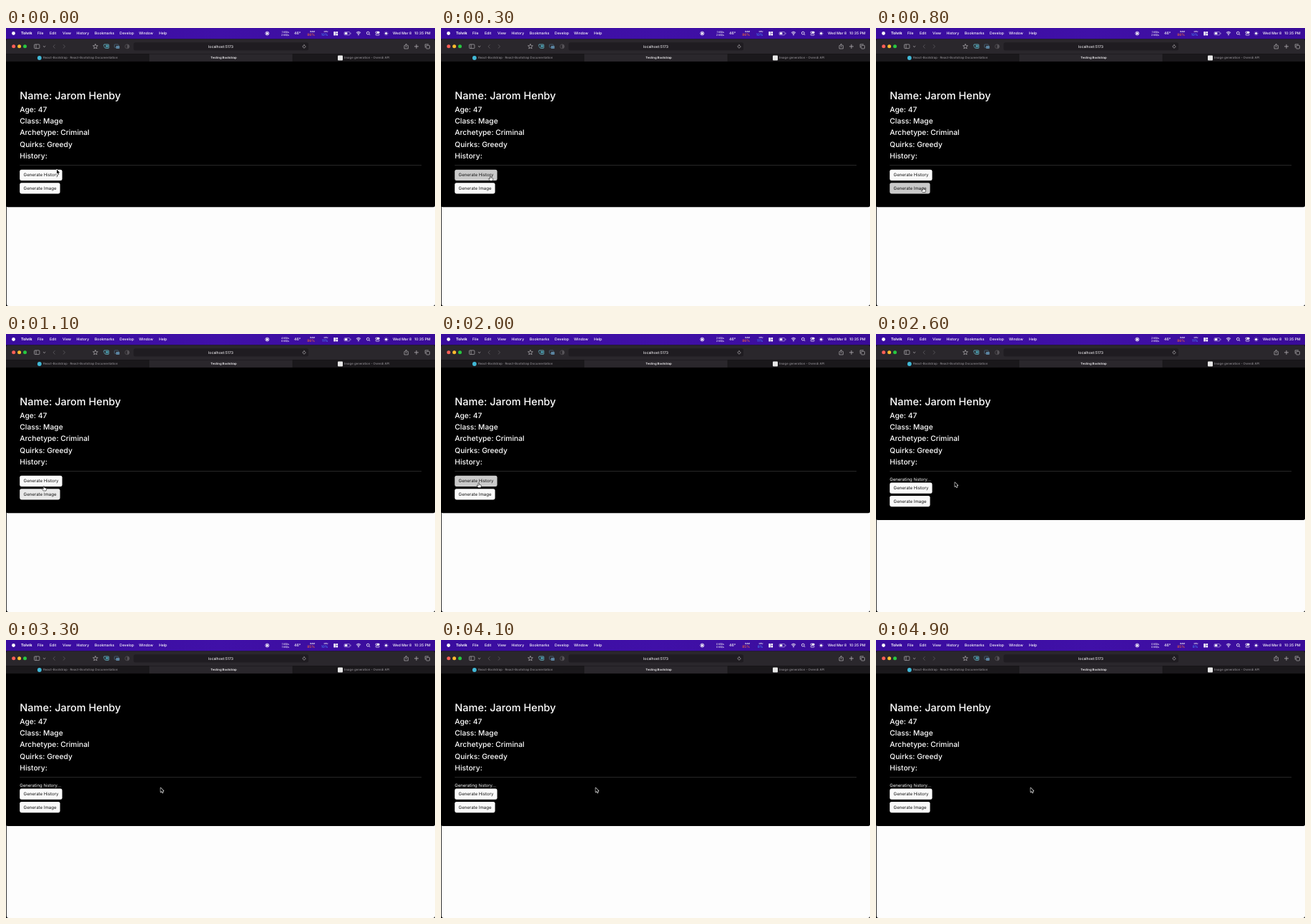
These frames come from a looping animation (600 by 390 pixels, 5000 ms). An HTML page with a canvas:

```html
<!DOCTYPE html>
<html lang="en">
<head>
<meta charset="utf-8">
<title>Testing Bootstrap</title>
<style>
  html, body { margin: 0; width: 100%; height: 100%; overflow: hidden; background: #000; }
  canvas { display: block; width: 600px; height: 390px; }
</style>
</head>
<body>
<canvas id="stage"></canvas>
<script>
const LOOP = 5000, STEP = 100, FADE = 150;
const canvas = document.getElementById('stage');
const g = canvas.getContext('2d');
const dpr = window.devicePixelRatio || 1;
canvas.width = 600 * dpr;
canvas.height = 390 * dpr;
g.scale(dpr, dpr);

function rect(x, y, w, h, color, r = 0) {
  g.fillStyle = color;
  g.beginPath();
  g.roundRect(x, y, w, h, r);
  g.fill();
}

function box(x, y, w, h, color, r = 0, lw = 0.7) {
  g.strokeStyle = color;
  g.lineWidth = lw;
  g.beginPath();
  g.roundRect(x, y, w, h, r);
  g.stroke();
}

function dot(x, y, r, color) {
  g.fillStyle = color;
  g.beginPath();
  g.arc(x, y, r, 0, Math.PI * 2);
  g.fill();
}

function ring(x, y, r, color, lw = 0.7, from = 0, to = Math.PI * 2) {
  g.strokeStyle = color;
  g.lineWidth = lw;
  g.beginPath();
  g.arc(x, y, r, from, to);
  g.stroke();
}

function line(points, color, lw = 0.8) {
  g.strokeStyle = color;
  g.lineWidth = lw;
  g.beginPath();
  for (let i = 0; i < points.length; i += 2) g.lineTo(points[i], points[i + 1]);
  g.stroke();
}

function text(str, x, y, size, color = '#fff', weight = 400, align = 'left') {
  g.font = `${weight} ${size}px Inter, "Liberation Sans", sans-serif`;
  g.textAlign = align;
  g.fillStyle = color;
  g.fillText(str, x, y);
}

// Cursor stops: time, x, y of the tip
const path = [
  [0, 71, 198.5], [100, 71, 198.5], [600, 66, 223.5], [800, 66, 223.5],
  [1100, 53, 213], [1200, 53, 213], [1400, 52.7, 208.5], [2400, 52.7, 208.5],
  [2900, 216.3, 207.3], [LOOP, 216.3, 207.3]
];
const historyHover = [[150, 350], [1200, 2450]];
const imageHover = [[400, 1000]];

// Time, download, upload, memory, processor
const stats = [
  [0, 1, 2, 86, 10], [900, 4, 6, 86, 11], [1500, 2, 2, 86, 11],
  [2700, 1, 1, 85, 10], [3900, 0, 0, 85, 8]
];

const clamp = v => Math.max(0, Math.min(1, v));

function cursorAt(t) {
  const i = path.findIndex(p => p[0] > t);
  const [t0, x0, y0] = path[i - 1], [t1, x1, y1] = path[i];
  const k = (t - t0) / (t1 - t0), e = k * k * (3 - 2 * k);
  return [x0 + (x1 - x0) * e, y0 + (y1 - y0) * e];
}

function hoverAt(spans, t) {
  return Math.max(...spans.map(([a, b]) => Math.min(clamp((t - a) / FADE), clamp(1 - (t - b) / FADE))));
}

function menuBar(t) {
  const grad = g.createLinearGradient(0, 0, 600, 0);
  grad.addColorStop(0, '#390c9e');
  grad.addColorStop(0.5, '#4010a8');
  grad.addColorStop(1, '#390b98');
  rect(0, 0, 600, 15.5, grad);
  dot(10.5, 7.5, 2.4, '#fff');
  text('Tolvik', 21, 7.7, 5.3, '#fff', 700);
  const items = { File: 44, Edit: 61, View: 79, History: 98.5, Bookmarks: 124, Develop: 159, Window: 186, Help: 214 };
  for (const name in items) text(name, items[name], 7.7, 5.1, '#fff', 500);

  ring(365.3, 7.6, 2.5, '#fff', 0.8);
  rect(364, 6.3, 2.6, 2.6, '#fff', 0.5);

  const [, down, up, ram, cpu] = stats.filter(s => s[0] <= t).pop();
  text(down + ' KB/s', 396, 5.6, 3.5, '#fff', 500, 'right');
  text(up + ' KB/s', 396, 9.9, 3.5, '#fff', 500, 'right');
  text('46°', 403, 7.7, 5.2, '#fff', 500);
  text('RAM', 432, 5.2, 2.9, '#fff', 600, 'right');
  text(ram + '%', 432, 9.5, 4.8, '#f0683c', 500, 'right');
  text('CPU', 450.5, 5.2, 2.9, '#fff', 600, 'right');
  text(cpu + '%', 450.5, 9.5, 4.8, '#4684f5', 500, 'right');

  rect(458.3, 5, 2.6, 5.4, '#fff', 0.5);
  rect(461.5, 5, 2.6, 2.4, '#fff', 0.5);
  rect(461.5, 8, 2.6, 2.4, '#fff', 0.5);
  box(473, 5.5, 8, 4.4, '#c9bce8', 1.2, 0.6);
  rect(473.8, 6.3, 3.6, 2.8, '#fff', 0.6);
  rect(481.7, 6.8, 0.7, 1.8, '#c9bce8');
  for (const r of [1.7, 3.2, 4.7]) ring(493, 10, r, '#fff', 0.8, -2.3, -0.84);
  dot(493, 9.9, 0.6, '#fff');
  ring(506.3, 7.1, 1.9, '#fff', 0.8);
  line([507.7, 8.5, 509.2, 10], '#fff');
  rect(516.7, 4.8, 5.8, 2.7, '#fff', 1.3);
  dot(518.2, 6.15, 0.8, '#390b98');
  box(517, 8.2, 5.2, 2.1, '#fff', 1, 0.6);
  for (let i = 0; i < 8; i++) {
    const a = i * Math.PI / 4, c = Math.cos(a), s = Math.sin(a);
    line([531.7 + c * 2, 7.6 + s * 2, 531.7 + c * 3, 7.6 + s * 3], '#cfc5ea', 0.7);
  }
  dot(531.7, 7.6, 1.7, '#fff');
  text('Wed Mar 8', 541, 7.7, 5.05, '#fff', 500);
  text('10:35 PM', 593.5, 7.7, 5.05, '#fff', 500, 'right');
}

function toolbar() {
  const ink = '#b5b2b6', dim = '#59565b';
  rect(0, 15.5, 600, 21, '#2a272c', [3, 3, 0, 0]);
  ['#fe5f57', '#febc2e', '#28c840'].forEach((c, i) => dot(10.7 + i * 7.9, 25.8, 2.5, c));
  box(39.5, 23, 7.4, 5.6, ink, 1);
  line([42, 23, 42, 28.6], ink, 0.7);
  line([52, 25.2, 53.6, 26.7, 55.2, 25.2], ink);
  line([68.5, 23.3, 66, 25.9, 68.5, 28.5], dim, 0.9);
  line([80, 23.3, 82.5, 25.9, 80, 28.5], dim, 0.9);

  const star = [];
  for (let i = 0; i <= 10; i++) {
    const a = i * Math.PI / 5 - Math.PI / 2, r = i % 2 ? 1.6 : 3.6;
    star.push(125 + Math.cos(a) * r, 26 + Math.sin(a) * r);
  }
  line(star, ink, 0.7);
  box(136.8, 23, 7, 5.4, '#6cc5d6', 0.8, 0.8);
  rect(136, 25.4, 3.5, 4, '#2a272c');
  ring(136.7, 28.8, 2.4, '#6cc5d6', 0.7, -1.57, 0);
  rect(139.5, 24, 3.3, 3.2, '#4593a5');
  box(151.6, 23, 5.6, 4.4, '#4f7188', 0.8);
  rect(153.8, 25, 5, 4, '#5b83a0', 0.7);
  ring(169.5, 25.9, 3, dim);
  g.fillStyle = dim;
  g.beginPath();
  g.arc(169.5, 25.9, 2.8, -Math.PI / 2, Math.PI / 2);
  g.fill();

  rect(178.5, 20.3, 244.5, 11.2, '#1f1c21', 2.5);
  text('localhost:5173', 300.5, 26, 5.1, '#ebe9ec', 500, 'center');
  ring(417, 26, 1.9, ink, 0.7, -0.6, 4.6);
  line([416.6, 23.2, 418, 24.2, 416.7, 25.1], ink, 0.6);

  line([558.3, 24.6, 557, 24.6, 557, 29, 562.4, 29, 562.4, 24.6, 561.1, 24.6], ink, 0.7);
  line([559.7, 27, 559.7, 22.4], ink, 0.7);
  line([558.2, 23.8, 559.7, 22.3, 561.2, 23.8], ink, 0.7);
  line([571, 25.9, 577, 25.9], ink);
  line([574, 22.9, 574, 28.9], ink);
  box(587.7, 24.4, 4.8, 4.6, ink, 0.8);
  line([586.2, 27.6, 586.2, 22.9, 591, 22.9], ink, 0.7);
}

function tabs() {
  rect(0, 36.5, 600, 11, '#1a181b');
  rect(200, 36.5, 201, 11, '#2a272c');
  line([200, 36.5, 200, 47.5], '#111', 0.5);
  line([401, 36.5, 401, 47.5], '#111', 0.5);
  line([0, 47.3, 600, 47.3], '#0c0b0d', 0.5);
  dot(46.8, 42, 2.9, '#41b8d6');
  text('React-Bootstrap · React-Bootstrap Documentation', 52, 42, 4.35, '#8b888d', 500);
  text('Testing Bootstrap', 304.5, 42, 4.25, '#f2f0f3', 600, 'center');
  rect(464, 38.5, 7, 7, '#e8e8e8', 1);
  text('Image generation - Ovendi API', 473, 42, 4.35, '#8b888d', 500);
}

function button(label, y, w, hover) {
  const c = Math.round(250 - 48 * hover);
  rect(19.2, y, w, 15.3, `rgb(${c},${c},${c})`, 2.4);
  text(label, 24.6, y + 7.8, 6.1, '#111');
}

function page(t) {
  const busy = t >= 2100, shift = busy ? 9.7 : 0;
  rect(0, 47.5, 600, 342.5, '#000');
  rect(0.8, 240, 599.2, 150, '#fdfdfd', [0, 0, 3, 3]);
  rect(0, 47.5, 600, 203.7 + shift, '#000', [0, 0, 2.5, 2.5]);
  text('Name: Jarom Henby', 19.3, 95.8, 14.5, '#fff', 500);
  ['Age: 47', 'Class: Mage', 'Archetype: Criminal', 'Quirks: Greedy', 'History:']
    .forEach((s, i) => text(s, 19.3, 114.7 + i * 16.35, 10.25, '#fff', 500));
  rect(19.2, 192.2, 562, 0.8, '#343434');
  if (busy) text('Generating history...', 19.2, 204, 6.05);
  button('Generate History', 198.8 + shift, 59.4, hoverAt(historyHover, t));
  button('Generate Image', 217.2 + shift, 56.4, hoverAt(imageHover, t));
}

function outline(d, x, y) {
  const shape = new Path2D(d);
  g.save();
  g.translate(x, y);
  g.lineJoin = 'round';
  g.strokeStyle = '#fff';
  g.lineWidth = 1.2;
  g.stroke(shape);
  g.fillStyle = '#000';
  g.fill(shape);
  g.restore();
}

function hand(x, y) {
  const shape = new Path2D('M-.7 .6Q0-.4 .7 .6V2.8L3 3.3Q3.8 3.6 3.6 4.6L3 7H-.8L-2.7 4.4Q-2.7 3.3-1.6 3.9L-.7 4.5Z');
  g.save();
  g.translate(x, y);
  g.lineJoin = 'round';
  g.fillStyle = '#fff';
  g.fill(shape);
  g.strokeStyle = '#111';
  g.lineWidth = 0.6;
  g.stroke(shape);
  g.restore();
}

function cursor(t) {
  const [x, y] = cursorAt(t);
  if (t >= 150 && t < 2500) hand(x, y);
  else outline('M0 0V6L1.4 4.8L2.4 7.1L3.4 6.7L2.4 4.4H4.2Z', x, y);
}

function draw(now) {
  const t = Math.floor((now % LOOP) / STEP) * STEP;
  g.textBaseline = 'middle';
  g.textRendering = 'geometricPrecision';
  rect(0, 0, 600, 390, '#000');
  menuBar(t);
  toolbar();
  tabs();
  page(t);
  cursor(t);
}

const start = performance.now();
function tick() {
  draw(performance.now() - start);
  requestAnimationFrame(tick);
}
tick();
</script>
</body>
</html>
```
